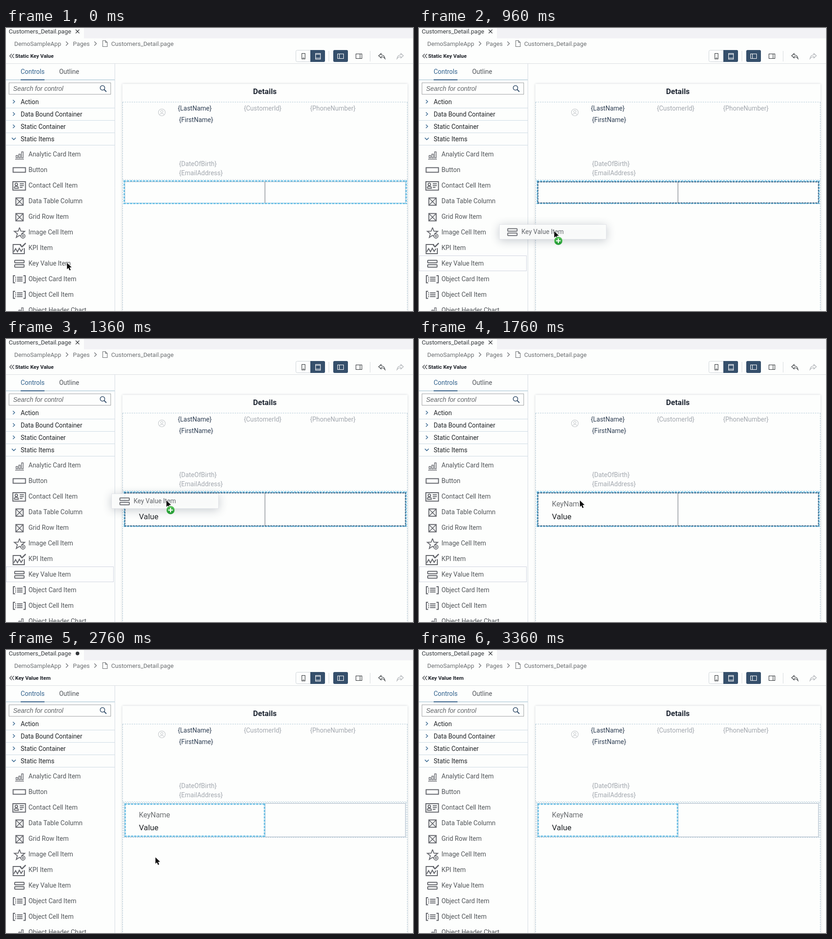
Write an HTML page with a canvas that moves like this. It is 888 by 617 pixels and loops after 4.06 s.

```html
<!DOCTYPE html>
<html lang="en">
<head>
<meta charset="utf-8">
<title>Page designer</title>
<style>
html, body { margin: 0; width: 100%; height: 100%; overflow: hidden; background: #fdfefd; }
canvas { display: block; }
</style>
</head>
<body>
<canvas id="stage" width="888" height="617"></canvas>
<script>
const ctx = document.getElementById('stage').getContext('2d');
const LOOP = 4060;
const BG = '#fdfefd', INK = '#32363a', NAVY = '#354f6b', GREY = '#6a6d70', PALE = '#a3a8af';
const RULE = '#cddae4', SKY = '#6cc0e6', ICON = '#63656b', DASH = '#b4cbd8';

// start time, pointer kind, x, y
const POINTER = [
  [0, 'arrow', 133, 512], [260, 'arrow', 121, 506], [560, 'hand', 121, 513],
  [760, 'drag', 178, 508], [960, 'drag', 295, 443], [1160, 'drag', 345, 375],
  [1360, 'drag', 350, 352], [1560, 'drag', 352, 354], [1760, 'arrow', 351, 352],
  [1960, 'move', 351, 357], [2760, 'arrow', 326, 452], [2960, 'arrow', 428, 593],
  [3160, 'none', 0, 0]
];
const ITEMS = [
  ['Analytic Card Item', bars], ['Button', y => box(15.5, y - 4.5, 27, 10, ICON, 2)],
  ['Contact Cell Item', contact], ['Data Table Column', crossBox], ['Grid Row Item', crossBox],
  ['Image Cell Item', star], ['KPI Item', chart], ['Key Value Item', y => pair(29, y)],
  ['Object Card Item', bracket], ['Object Cell Item', bracket], ['Object Header Chart', bars]
];

function text(s, x, y, size = 14, color = INK, style = '', family = 'Roboto') {
  ctx.font = `${style} ${size}px ${family}, "Liberation Sans", sans-serif`;
  ctx.fillStyle = color;
  ctx.fillText(s, x, y);
}
function fill(x, y, w, h, color) {
  ctx.fillStyle = color;
  ctx.fillRect(x, y, w, h);
}
function line(pts, color = ICON, width = 1, dash = []) {
  ctx.strokeStyle = color;
  ctx.lineWidth = width;
  ctx.setLineDash(dash);
  ctx.beginPath();
  for (let i = 0; i < pts.length; i += 2) ctx.lineTo(pts[i], pts[i + 1]);
  ctx.stroke();
  ctx.setLineDash([]);
}
function box(x, y, w, h, color, width = 1) {
  ctx.strokeStyle = color;
  ctx.lineWidth = width;
  ctx.strokeRect(x, y, w, h);
}
// every side starts its own dash run at the corner
function dashBox(x, y, w, h, color, width, dash) {
  const e = width / 2, r = x + w, b = y + h;
  for (const side of [[x - e, y, r + e, y], [x - e, b, r + e, b], [x, y - e, x, b + e], [r, y - e, r, b + e]])
    line(side, color, width, dash);
}
function circle(x, y, r, stroke, width = 1, inside) {
  ctx.beginPath();
  ctx.arc(x, y, r, 0, 7);
  if (inside) { ctx.fillStyle = inside; ctx.fill(); }
  if (stroke) { ctx.strokeStyle = stroke; ctx.lineWidth = width; ctx.stroke(); }
}
function round(x, y, w, h, r, color) {
  ctx.beginPath();
  ctx.roundRect(x, y, w, h, r);
  ctx.fillStyle = color;
  ctx.fill();
}
function chevron(x, y, s, color, width, down) {
  line(down ? [x - s, y - s / 2, x, y + s / 2, x + s, y - s / 2]
            : [x - s / 2, y - s, x + s / 2, y, x - s / 2, y + s], color, width);
}

// sidebar icons, y is the centre of the row
function bars(y) {
  [5, 8, 13].forEach((h, i) => box(22 + i * 6, y + 8 - h, 3.5, h, ICON, 1.4));
  line([20, y + 11, 39, y + 11], ICON, 1.4);
}
function contact(y) {
  box(15, y - 8, 27.5, 18.5, ICON, 2);
  circle(22.5, y - 2, 2.8, ICON, 1.8);
  line([18, y + 6.5, 18.5, y + 3.5, 21, y + 2, 24, y + 2, 26.5, y + 3.5, 27, y + 6.5, 18, y + 6.5], ICON, 1.8);
  line([30, y - 3.5, 39, y - 3.5], ICON, 2);
  line([30, y + .5, 39, y + .5], ICON, 2);
  line([30, y + 4.5, 36, y + 4.5], ICON, 2);
}
function crossBox(y) {
  box(21.5, y - 6.5, 16, 16, ICON, 2);
  line([22, y - 6, 37, y + 9], ICON, 1.7);
  line([37, y - 6, 22, y + 9], ICON, 1.7);
}
function star(y) {
  const p = [];
  for (let i = 0; i <= 10; i++) {
    const r = i % 2 ? 5 : 12, a = i * Math.PI / 5 - Math.PI / 2;
    p.push(29.5 + r * Math.cos(a), y + 2 + r * Math.sin(a));
  }
  line(p, ICON, 1.8);
  circle(37, y + 8.5, 4.6, ICON, 1.6, BG);
  line([34.5, y + 8.5, 39.5, y + 8.5], ICON, 1.5);
  line([37, y + 6, 37, y + 11], ICON, 1.5);
}
function chart(y) {
  line([33, y - 7, 15.5, y - 7, 15.5, y + 13, 40, y + 13, 40, y + 1], ICON, 2);
  line([17, y + 9, 21, y + 2, 25, y + 9, 29, y + 1, 33, y + 8, 37, y + 2], ICON, 2);
  line([31, y - 6, 35, y - 2, 43, y - 10], ICON, 2.6);
}
function pair(x, y) {
  for (const dy of [-6.5, 3]) {
    ctx.beginPath();
    ctx.roundRect(x - 10, y + dy, 20.5, 5.5, 1);
    ctx.strokeStyle = ICON;
    ctx.lineWidth = 2;
    ctx.stroke();
  }
}
function bracket(y) {
  line([20, y - 7, 16, y - 7, 16, y + 8.5, 20, y + 8.5], ICON, 2);
  line([38, y - 7, 42, y - 7, 42, y + 8.5, 38, y + 8.5], ICON, 2);
  for (const dy of [-3.5, .5, 4.5]) {
    fill(20, y + dy - 1, 2, 2, ICON);
    fill(24, y + dy - 1, 12, 2, ICON);
  }
}

function undo(x, dir, color) {
  ctx.save();
  ctx.translate(x, 61);
  ctx.scale(dir, 1);
  ctx.beginPath();
  ctx.moveTo(-7, -.5);
  ctx.lineTo(-1.5, -5.5);
  ctx.lineTo(-1.5, -2.5);
  ctx.quadraticCurveTo(6, -2, 7, 6);
  ctx.quadraticCurveTo(4, 1.5, -1.5, 1.5);
  ctx.lineTo(-1.5, 4.5);
  ctx.closePath();
  ctx.strokeStyle = color;
  ctx.lineWidth = 1.2;
  ctx.stroke();
  ctx.restore();
}

function header(t) {
  fill(170, 0, 718, 22.5, '#f2f2f5');
  text('Customers_Detail.page', 6, 12, 13.2, INK);
  if (t >= 1960 && t < 2960) circle(156, 7.5, 4, null, 0, INK);
  else {
    line([152, 3.5, 160, 11.5], INK, 1.2);
    line([160, 3.5, 152, 11.5], INK, 1.2);
  }
  text('DemoSampleApp', 18, 39, 13.2, GREY);
  chevron(133, 34, 4.5, GREY, 1.3);
  text('Pages', 146, 39, 13.2, GREY);
  chevron(195, 34, 4.5, GREY, 1.3);
  line([217, 27.5, 211, 27.5, 211, 40.5, 221, 40.5, 221, 31.5, 217, 27.5, 217, 31.5, 221, 31.5], GREY, 1.1);
  text('Customers_Detail.page', 229.5, 39, 13.2, GREY);
  for (const x of [8, 13]) line([x + 4.5, 56.5, x, 61, x + 4.5, 65.5], INK, 1.2);
  text(t < 2160 ? 'Static Key Value' : 'Key Value Item', 20, 65, 11.5, '#1d2128', 'bold');

  ctx.beginPath();
  ctx.roundRect(632.5, 48.5, 63, 25, 3);
  ctx.strokeStyle = '#cfd4d9';
  ctx.lineWidth = 1;
  ctx.stroke();
  round(664, 48, 32, 26, [0, 3, 3, 0], NAVY);
  round(714, 48, 32, 26, 3, NAVY);
  box(645.5, 55.5, 7, 12, INK, 1.1);
  line([647, 65.5, 651, 65.5], INK);
  box(675.5, 55.5, 10.5, 12.5, '#fff', 1.2);
  line([675, 57.5, 686, 57.5], '#fff');
  line([675, 65.5, 686, 65.5], '#fff');
  box(723.5, 56.5, 13, 10, '#fff', 1.1);
  line([727.5, 56, 727.5, 67], '#fff', 1.1);
  box(763.5, 56.5, 13, 10, INK, 1.1);
  line([772.5, 56, 772.5, 67], INK, 1.1);
  line([704.5, 50, 704.5, 73], '#d5d9dd');
  line([794.5, 50, 794.5, 73], '#d5d9dd');
  undo(820, 1, INK);
  undo(860, -1, '#a9adb2');
  line([0, 77.5, 888, 77.5], '#d9dde1');
}

function sidebar(t) {
  line([237.5, 78, 237.5, 617], '#d3dbe2');
  text('Controls', 32, 100, 13.9, '#2f608c');
  text('Outline', 116, 100, 13.9, '#51555a');
  line([0, 113, 237, 113], '#b9cfdd', 1.5);
  fill(32, 112, 52, 2, '#35618a');
  box(6.5, 119.5, 222, 25, '#a0a2a4');
  text('Search for control', 15.5, 136.5, 13.9, '#606367', 'italic', '"Liberation Sans"');
  circle(210.5, 130.5, 5, NAVY, 1.5);
  line([214, 134, 219, 139], NAVY, 1.9);
  ['Action', 'Data Bound Container', 'Static Container', 'Static Items'].forEach((s, i) => {
    const y = 160.5 + i * 27;
    chevron(17, y, i < 3 ? 3.8 : 4.2, '#3b6a92', 1.5, i === 3);
    text(s, 32, y + 5, 13.8, '#1f2226');
    line([0, y + 14, 237, y + 14], RULE);
  });
  if (t >= 260 && t < 1960) {
    box(.5, 496.5, 234, 33, '#cfd3e0');
    if (t < 760) {
      circle(214, 513, 5.7, INK, 1.1);
      text('?', 211.6, 516.4, 9, INK, 'bold');
    }
  }
  ITEMS.forEach(([name, icon], i) => {
    const y = 275 + i * 34;
    icon(y);
    text(name, 49, y + 5, 14, '#515559');
  });
}

function page() {
  ctx.save();
  ctx.shadowColor = 'rgba(60,70,90,.22)';
  ctx.shadowBlur = 5;
  fill(254, 122, 622, 500, BG);
  ctx.restore();
  text('Details', 539, 143.5, 16.6, '#1f2733', 'bold');
  line([254, 161.5, 876, 161.5], DASH, 1, [3, 2]);
  line([254.5, 162, 254.5, 617], DASH, 1, [3, 2]);
  line([875.5, 162, 875.5, 617], DASH, 1, [3, 2]);
  circle(340, 184, 7.5, '#c3c6ca', 1.1);
  circle(340, 182, 2.6, '#c3c6ca');
  line([335.5, 189, 337, 186.5, 343, 186.5, 344.5, 189], '#c3c6ca');
  text('{LastName}', 375, 180, 14, '#2f3f54');
  text('{FirstName}', 377.5, 205, 14, '#2f3f54');
  text('{CustomerId}', 519, 180, 14, PALE);
  text('{PhoneNumber}', 663.5, 180, 14, PALE);
  text('{DateOfBirth}', 377.5, 301, 14, PALE);
  text('{EmailAddress}', 377.5, 321, 14, PALE);
  line([254, 330.5, 876, 330.5], '#c2d5e1', 1, [3, 2]);
}

function section(t) {
  const h = t < 1160 ? 50 : 76;
  if (t < 1960) {
    box(259.5, 335.5, 612, h - 4, '#b4c2cc');
    line([565, 335, 565, 331 + h], '#a4a8ad', 1.8);
    dashBox(258, 333.5, 615, h - 1, SKY, t < 760 ? 3 : 2.4, [5, 2]);
    if (t >= 760) {
      ctx.globalAlpha = t < 960 || (t >= 1160 && t < 1360) ? .55 : 1;
      dashBox(259.5, 335.5, 612, h - 4, '#2b587b', 1.8, [4, 2]);
      ctx.globalAlpha = 1;
    }
  } else {
    dashBox(256.5, 332.5, 617, 76, DASH, 1, [3, 2]);
    box(565.5, 334.5, 306, 73, '#a9b7c6', 1.1);
    box(258.5, 334.5, 307, 73, '#b9c8d4');
    dashBox(260, 336, 304, 70, SKY, 3, [5, 2]);
  }
  if (t >= 1160) {
    text('KeyName', 290, 364.5, 15.9, '#6a6d70');
    text('Value', 290, 393, 17.2, '#1f2226');
  }
  if (t >= 1960 && t < 2760) {
    fill(259, 335, 84.5, 15.5, '#5f9cbc');
    text('Key Value Item', 261, 347.5, 12, '#fff');
  }
}

function arrow(x, y) {
  ctx.beginPath();
  [0, 0, 0, 14, 3.2, 11, 5.6, 16.5, 8.2, 15.4, 5.8, 10, 10.2, 9.8]
    .forEach((v, i, p) => i % 2 || ctx.lineTo(x + v, y + p[i + 1]));
  ctx.closePath();
  ctx.lineJoin = 'round';
  ctx.strokeStyle = '#fff';
  ctx.lineWidth = 2;
  ctx.stroke();
  ctx.fillStyle = '#111';
  ctx.fill();
  ctx.lineJoin = 'miter';
}
function hand(x, y) {
  const fingers = [[-4.5, -4, -1, 3], [-1.5, -6, 1, 2], [1.8, -6, 2.5, 2], [5, -4, 4, 3], [-6, 1, -1, 6]];
  ctx.lineCap = 'round';
  for (const [color, w, g] of [['#151515', 4.2, 1], ['#fff', 2, 0]]) {
    for (const [a, b, c, d] of fingers) line([x + a, y + b, x + c, y + d], color, w);
    ctx.fillStyle = color;
    ctx.beginPath();
    ctx.ellipse(x + 1.5, y + 3.5, 4.5 + g, 4 + g, 0, 0, 7);
    ctx.fill();
  }
  ctx.lineCap = 'butt';
  for (const dx of [-.8, 1.5, 3.6]) line([x + dx, y - 2, x + dx + .2, y + 2], '#222', .8);
}
function move(x, y) {
  for (const [color, w] of [['#fff', 3.2], ['#111', 1.5]]) {
    for (let i = 0; i < 4; i++) {
      ctx.save();
      ctx.translate(x, y);
      ctx.rotate(i * Math.PI / 2);
      line([0, 0, 0, -5], color, w);
      ctx.beginPath();
      ctx.moveTo(0, -6.5);
      ctx.lineTo(-2.6, -3.5);
      ctx.lineTo(2.6, -3.5);
      ctx.closePath();
      if (w > 2) ctx.stroke();
      ctx.fillStyle = color;
      ctx.fill();
      ctx.restore();
    }
  }
}
function drag(x, y) {
  const left = x - 120, top = y - 15;
  ctx.save();
  ctx.globalAlpha = .92;
  ctx.shadowColor = 'rgba(40,50,75,.28)';
  ctx.shadowBlur = 20;
  ctx.shadowOffsetY = 3;
  fill(left, top, 234, 33, BG);
  ctx.restore();
  box(left + .5, top + .5, 233, 32, '#e3e5ea');
  ctx.globalAlpha = .92;
  pair(left + 28.5, top + 16);
  text('Key Value Item', left + 48.5, top + 21, 14, '#56595e');
  ctx.globalAlpha = 1;
  arrow(x, y);
  const g = ctx.createLinearGradient(0, y + 12, 0, y + 31);
  g.addColorStop(0, '#5cc45c');
  g.addColorStop(1, '#15922a');
  circle(x + 9, y + 21, 9.3, '#e4f2e4', 1, g);
  line([x + 4, y + 21, x + 14, y + 21], '#fff', 2.2);
  line([x + 9, y + 16, x + 9, y + 26], '#fff', 2.2);
}

const pointers = { arrow, hand, move, drag, none() {} };

function draw(t) {
  fill(0, 0, 888, 617, BG);
  page();
  section(t);
  header(t);
  sidebar(t);
  const [, kind, x, y] = POINTER.findLast(p => p[0] <= t);
  pointers[kind](x, y);
}
function tick() {
  draw(performance.now() % LOOP);
  requestAnimationFrame(tick);
}
tick();
</script>
</body>
</html>
```
